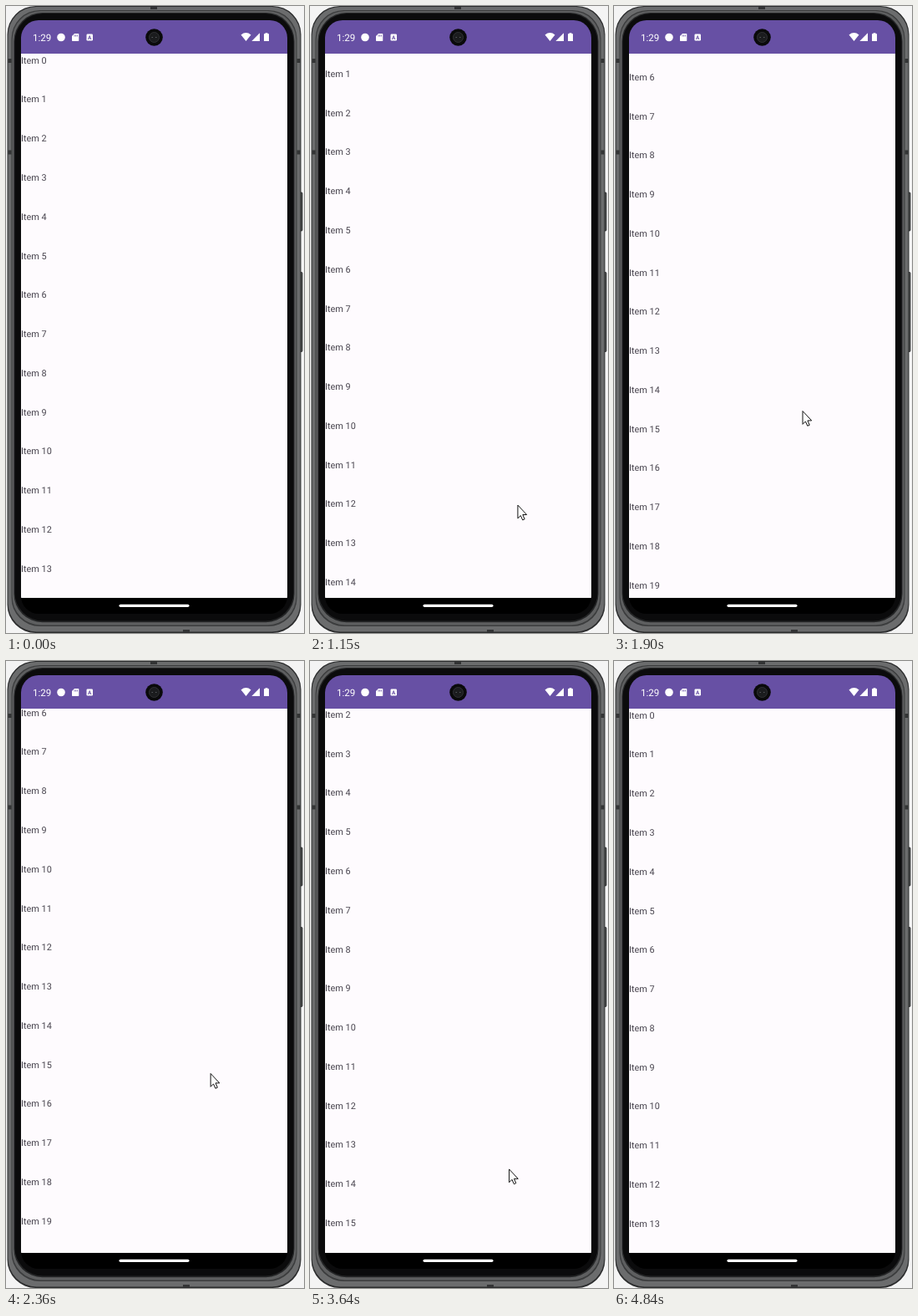
Write an HTML page that moves like this. It is 357 px wide and 750 px high and loops after 6160 ms.

```html
<!DOCTYPE html>
<html lang="en">
<head>
<meta charset="utf-8">
<title>Scrolling list</title>
<style>
  html, body { margin: 0; width: 100%; height: 100%; overflow: hidden; background: #f4f4f4; }
  svg { display: block; }
  text { font-family: Roboto, sans-serif; text-rendering: geometricPrecision; }
  #list text { font-size: 10.9px; fill: #49454f; }
</style>
</head>
<body>
<svg width="357" height="750" viewBox="0 0 357 750">
  <defs>
    <clipPath id="page"><rect x="18" y="57" width="319" height="651"/></clipPath>
    <clipPath id="screen"><rect x="18" y="17" width="319" height="710" rx="21"/></clipPath>
  </defs>

  <g id="casing">
    <g fill="#505152" stroke="#202122" stroke-width=".8">
      <rect x="350" y="223" width="5" height="46" rx="1"/>
      <rect x="350" y="318.500" width="5" height="95" rx="1"/>
    </g>
  </g>
  <g id="antennas" fill="#333435"></g>

  <g clip-path="url(#screen)">
    <rect x="18" y="17" width="319" height="710"/>
    <rect x="18" y="17" width="319" height="40" fill="#6750a4"/>
    <rect x="18" y="57" width="319" height="651" fill="#fefbfe"/>
  </g>
  <rect x="135.500" y="715.700" width="84" height="3.200" rx="1.600" fill="#fff"/>

  <!-- status bar -->
  <g fill="#fff">
    <text x="32" y="42" font-size="11.600">1:29</text>
    <circle cx="66" cy="37.500" r="4.800"/>
    <path d="M82 33h4.500q.8 0 .8 .8v7.400q0 .8-.8 .8h-6.700q-.8 0-.8-.8v-5.200z"/>
    <rect x="96.500" y="33.500" width="7.500" height="8" rx="1.200"/>
    <path d="M281.500 34.500Q287.500 29.700 293.500 34.500L287.500 42z"/>
    <path d="M304 32.300V42h-9.700z"/>
    <path d="M310.500 32.200h3v1.100h1.500V42h-6v-8.700h1.500z"/>
  </g>
  <path d="M82 34.500v2M83.700 34.500v2M85.400 34.500v2" stroke="#6750a4" stroke-width=".8"/>
  <text x="100.250" y="39.800" font-size="6.500" font-weight="700" text-anchor="middle" fill="#6750a4">A</text>

  <!-- camera -->
  <circle cx="177.500" cy="37.500" r="10.300" fill="#0a0a0b"/>
  <circle cx="177.500" cy="37.500" r="6" fill="#1b1c1e" stroke="#303134"/>
  <path d="M174.500 37.500h1.500M179 37.500h1.500" stroke="#55585c" stroke-width="1.200"/>

  <g clip-path="url(#page)"><g id="list"></g></g>
  <path id="cursor" d="M1 .5V16.300L4.400 12.900L6.800 18.300L9.200 17.200L6.900 11.900H11.700Z"
        fill="#fff" stroke="#111" stroke-linejoin="round"/>
</svg>

<script>
const LOOP = 6160, ROW = 46.77, ROWS = 22, FULL_SCROLL = 283.6;
const byId = id => document.getElementById(id);

function add(parent, tag, attributes) {
  const node = document.createElementNS("http://www.w3.org/2000/svg", tag);
  for (const name in attributes) node.setAttribute(name, attributes[name]);
  return byId(parent).appendChild(node);
}

// Casing layers by inset; the lower rim is the widest
const layers = { 0: "#2b2c2d", 1: "#6b6c6d", 5: "#3b3c3d", 6: "#5e5f60", 8: "#242526", 9: "#0b0b0c" };
for (const inset in layers) {
  add("casing", "rect", {
    x: 1.5 + +inset, y: +inset, width: 352 - 2 * inset, height: 750 - 2.6 * inset,
    rx: 34, fill: layers[inset]
  });
}

for (const x of [2.5, 348.5])
  for (const y of [63, 172.5]) add("antennas", "rect", { x, y, width: 4, height: 5 });
add("antennas", "rect", { x: 173, y: 1, width: 8, height: 3 });
add("antennas", "rect", { x: 212, y: 746, width: 8, height: 3 });

for (let i = 0; i < ROWS; i++)
  add("list", "text", { x: 18, y: 68.7 + i * ROW }).textContent = "Item " + i;

// A swipe and its fling together slow down evenly to rest
function swipe(time, start, duration) {
  const left = 1 - Math.min(Math.max((time - start) / duration, 0), 1);
  return 1 - left * left;
}

const scrollAt = time => FULL_SCROLL * (swipe(time, 1088, 1137) - swipe(time, 3185, 1077));

// Pointer tip: enter, swipe up, rest, circle round, swipe down, rest, leave
const stops = [
  { t: 610, x: 345, y: 740 }, { t: 1150, x: 248, y: 597 },
  { t: 1400, x: 231, y: 490 }, { t: 1900, x: 225, y: 484 },
  { t: 2360, x: 244, y: 493 }, { t: 2550, x: 271, y: 487 },
  { t: 3030, x: 250, y: 374 }, { t: 3280, x: 244, y: 458 },
  { t: 3550, x: 238, y: 606 }, { t: 4000, x: 236, y: 613 },
  { t: 4460, x: 244, y: 708 }, { t: 4840, x: 272, y: 752 }
];

function pointerAt(time) {
  const next = stops.findIndex(stop => stop.t > time);
  if (next < 1) return null;
  const a = stops[next - 1], b = stops[next];
  const u = (time - a.t) / (b.t - a.t);
  return { x: a.x + (b.x - a.x) * u, y: a.y + (b.y - a.y) * u };
}

function draw(time) {
  byId("list").setAttribute("transform", `translate(0 ${-scrollAt(time)})`);
  const tip = pointerAt(time);
  byId("cursor").style.display = tip ? "" : "none";
  if (tip) byId("cursor").setAttribute("transform", `translate(${tip.x} ${tip.y})`);
}

const start = performance.now();
function tick() {
  draw((performance.now() - start) % LOOP);
  requestAnimationFrame(tick);
}
tick();
</script>
</body>
</html>
```
